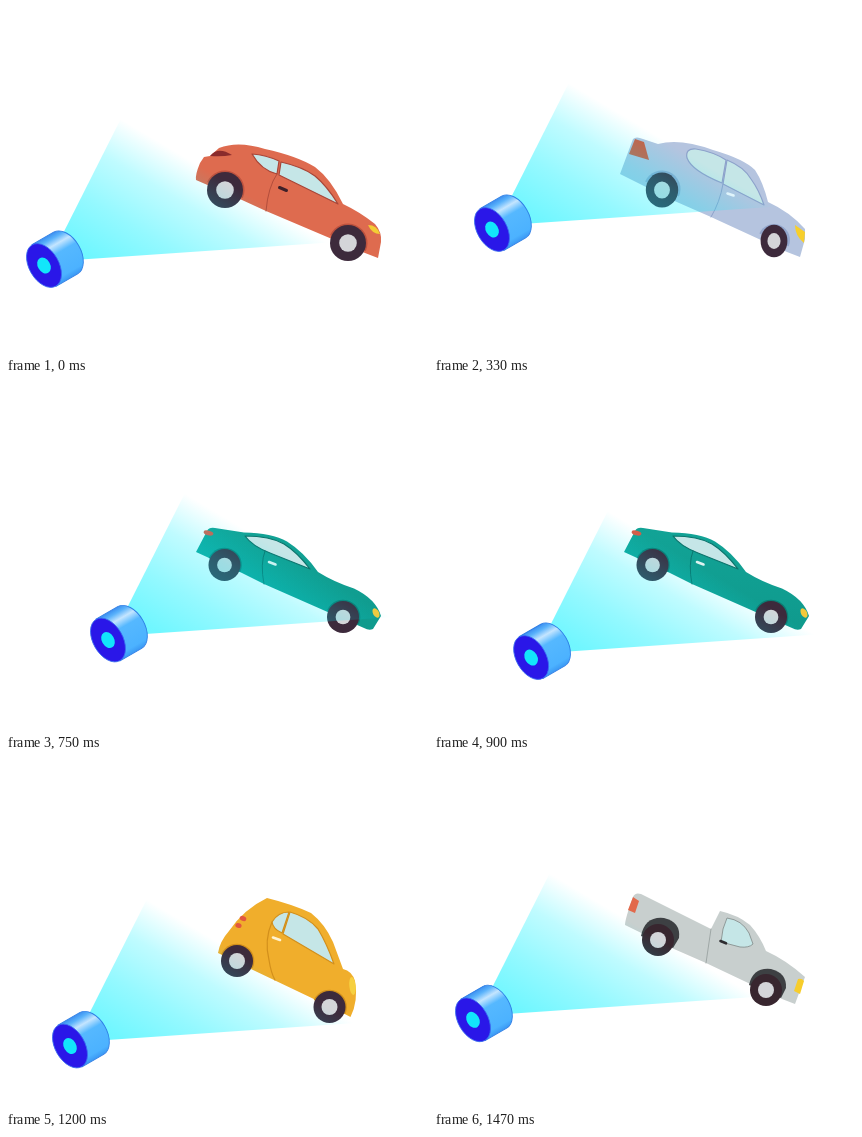
These frames come from a looping animation (422x349 px, 1500 ms). An HTML page:

```html
<!DOCTYPE html>
<html lang="en">
<head>
<meta charset="utf-8">
<title>Scanner</title>
<style>
  html, body { margin: 0; width: 100%; height: 100%; overflow: hidden; background: #fff; }
  svg { display: block; width: 100%; height: 100%; }
</style>
</head>
<body>
<svg viewBox="0 0 422 349" xmlns="http://www.w3.org/2000/svg">
  <defs>
    <linearGradient id="ray" gradientUnits="userSpaceOnUse" x1="30" y1="-20" x2="98" y2="-134">
      <stop offset="0" stop-color="#00f0ff" stop-opacity=".56"/>
      <stop offset=".35" stop-color="#00f0ff" stop-opacity=".42"/>
      <stop offset=".7" stop-color="#00f0ff" stop-opacity=".25"/>
      <stop offset="1" stop-color="#00f0ff" stop-opacity="0"/>
    </linearGradient>
    <linearGradient id="shell" x1="0" y1="0" x2="0" y2="1">
      <stop offset="0" stop-color="#3c8ff0"/>
      <stop offset=".1" stop-color="#59b2fb"/>
      <stop offset=".24" stop-color="#c4e5ff"/>
      <stop offset=".42" stop-color="#55b8ff"/>
      <stop offset=".88" stop-color="#4cb2ff"/>
      <stop offset="1" stop-color="#3a98f4"/>
    </linearGradient>
    <linearGradient id="teal" x1="0" y1="0" x2="0" y2="1">
      <stop offset="0" stop-color="#12a396"/>
      <stop offset="1" stop-color="#0f9a8d"/>
    </linearGradient>
  </defs>
  <g id="cars"></g>
  <g id="scanner">
    <path d="M19,-32 L77,-147 L285,-23 L30,-5.5Z" fill="url(#ray)"/>
    <g transform="rotate(-30)">
      <path d="M0,-24 H25 A15,24 0 0 1 25,24 H0Z" fill="url(#shell)" stroke="#2f7fe6" stroke-width=".9"/>
      <ellipse rx="14.8" ry="23.8" fill="#2a17e8" stroke="#3a6cf0" stroke-width=".8"/>
      <ellipse rx="6.2" ry="8.5" fill="#12e6fb"/>
    </g>
  </g>
</svg>
<script>
const LOOP = 1500;
const GLASS = '#c5e6e7';

const shape = (d, fill, line = 'none', w = 1) =>
  `<path d="${d}" fill="${fill}" stroke="${line}" stroke-width="${w}" stroke-linejoin="round"/>`;
const stroke = (d, color, w = 1) =>
  `<path d="${d}" fill="none" stroke="${color}" stroke-width="${w}" stroke-linecap="round"/>`;
const oval = (x, y, rx, ry, fill, turn = 0) =>
  `<ellipse cx="${x}" cy="${y}" rx="${rx}" ry="${ry}" fill="${fill}" transform="rotate(${turn} ${x} ${y})"/>`;
const wheel = (x, y, rx, ry, hub, tyre = '#3d2a3c') =>
  oval(x, y, rx, ry, tyre) + oval(x, y, hub * rx, hub * ry, '#d4d5d9');
// Upper half of the wheel housing, tilted with the car
const arch = (x, y, r, fill) =>
  `<path d="M${-r},0 A${r},${r} 0 0 1 ${r},0Z" fill="${fill}" transform="translate(${x} ${y}) rotate(24)"/>`;

const hatchback = [
  shape('M190,174 Q189,169 194,157 L198,151 L204,150 L213,142 Q232,134.5 259,143 Q291,150 309,161 Q325,173 337,198 Q354,206 369,218 Q376,226 375,236 L372,252 L359,247 L260,205 L236,194Z', '#de6b4f'),
  shape('M204,150 Q212,140 226,149 Q216,151 204,150Z', '#8a2b2c'),
  arch(219, 184, 19.5, '#bd523e'),
  arch(342, 237, 19.5, '#bd523e'),
  shape('M246,148 Q260,149 273,155 L271,168 Q255,164 246,148Z', GLASS, '#a84537', 1.2),
  shape('M275,156 Q297,161 309,170 Q321,180 332,198 L273,169Z', GLASS, '#a84537', 1.2),
  stroke('M271,168 Q262,181 260,205', '#b24d3b'),
  stroke('M273.5,181.5 L280.5,184.5', '#3d2029', 3),
  shape('M362,219 Q371,219 374,228 Q366,228 362,219Z', '#f3cd34'),
  wheel(219, 184, 18, 18, .49),
  wheel(342, 237, 18, 18, .49)
];

const sedan = [
  shape('M186,168 L199,133 Q202,130 209,133 L224,138 Q246,132 279,144 Q310,153 321,164 Q329,176 334,196 Q356,206 371,223 L371,233 L366,251 L353,246 L277,211 L236,193Z', '#b5c4df'),
  shape('M201,133 L210,136 L215,154 L195,148Z', '#cf5a3e'),
  arch(228, 183, 18.5, '#93a7cd'),
  arch(340, 234, 16, '#93a7cd'),
  shape('M253,152 Q251,142 262,143 Q280,146 292,154 L288,177 Q258,165 253,152Z', GLASS, '#8da2cb', 1.2),
  shape('M293,154 Q310,161 317,173 Q325,184 330,199 L289,178Z', GLASS, '#8da2cb', 1.2),
  stroke('M289,178 Q286,196 277,211', '#8da2cb'),
  stroke('M293.5,187.5 L299.5,189.5', '#f3f5fb', 2.6),
  shape('M361,219 L371,226 L370,237 Q361,230 361,219Z', '#f7cf2b'),
  wheel(228, 184, 16.2, 17.5, .49),
  wheel(340, 235, 13.4, 16.2, .49)
];

const coupe = [
  shape('M190,169 L201,148 Q203,144 209,145 L238,149.5 Q266,150 281,158.5 Q298,169 312,189 Q328,199 348,205.5 Q370,216 375,233 L367,246 Q363,248 358,245 L258,201 L236,190Z', 'url(#teal)'),
  oval(202.5, 150, 5, 2.4, '#d95a45', 15),
  arch(218.5, 182, 17.3, '#0b7d74'),
  arch(337, 234, 17.3, '#0b7d74'),
  shape('M239,153 Q264,153 278,161 Q291,169 304,186 L264,170 Q246,163 239,153Z', GLASS, '#0b746c', 1.2),
  stroke('M259,168 Q254,181 258,201', '#0a776f'),
  stroke('M263,179 L269.5,181.5', '#dff2f0', 2.6),
  oval(370, 230, 3, 5, '#f4c93a', -28),
  wheel(218.5, 182, 16, 16, .46),
  wheel(337, 234, 16, 16, .46)
];

const mini = [
  shape('M212,193 Q214,181 223,171 Q238,149 261,138 Q287,144.5 305,153 Q319,164 327,182 L337,209 Q346,211 349,221 Q352.5,241 344.5,257 L333,251 L247,210Z', '#f0ae2c'),
  oval(237, 158.5, 3.4, 2.5, '#e2573f', 20),
  oval(232.5, 165.5, 3.2, 2.4, '#e2573f', 20),
  arch(231, 201, 17.3, '#d28f1b'),
  arch(323.5, 247, 17.3, '#d28f1b'),
  shape('M266,162 Q272,152 283,152 L276,173 Q267,169 266,162Z', GLASS, '#d28f1b', 1.2),
  shape('M284,152 Q302,157 312,169 Q321,184 328,204 L277,174Z', GLASS, '#d28f1b', 1.2),
  stroke('M266,162 Q258,180 263,200 Q265,213 269,220', '#d28f1b', 1.2),
  stroke('M267,177.5 L274,180', '#fff3d2', 2.6),
  oval(346.5, 226, 3.2, 9, '#f6d040', -6),
  wheel(231, 201, 16, 16, .5),
  wheel(323.5, 247, 16, 16, .5)
];

const pickup = [
  shape('M191,165 Q191,159 199,137 Q201,132 207,134 L277,169 L286,151 Q304,155 316,165 Q326,176 332,191 Q352,200 371,217 L361,244 L348,239 L272,203 L240,189Z', '#c8cfce'),
  shape('M199,137 L205,141 L201,153 L194,150Z', '#e2694b'),
  shape('M207,176 Q211,156 230,158 Q247,162 245,178 L239,188Z', '#3d4043'),
  shape('M315,225 Q319,207 337,209 Q353,213 352,228 L347,238Z', '#3d4043'),
  shape('M287,182 Q288,168 293,158 Q308,160 315,173 L319,184 Q315,188 306,187Z', GLASS, '#8f9998', 1),
  stroke('M277,169 L272,203', '#9aa3a2', .9),
  stroke('M286.5,181 L292,183.3', '#2e2c30', 2.6),
  shape('M364,219 Q368,218 370,221 L366,234 L360,231Z', '#f7cd2b'),
  wheel(224, 180, 16, 16, .5, '#38262f'),
  wheel(332, 230, 16, 16, .5, '#38262f')
];

const fleet = document.getElementById('cars');
fleet.innerHTML = [hatchback, sedan, coupe, mini, pickup]
  .map(parts => `<g>${parts.join('')}</g>`).join('');
const cars = [...fleet.children];
const scanner = document.getElementById('scanner');

// Waypoints of the lens centre: time, x, y
const path = [
  [0, 38, 259.5], [75, 36.5, 250], [180, 41, 234], [330, 58, 223.5], [480, 78, 229],
  [750, 102, 257], [1050, 85, 289], [1200, 64, 286], [1470, 39, 259.8]
];
const n = path.length;

function point(i) {
  const turn = Math.floor(i / n), [t, x, y] = path[i - turn * n];
  return [t + turn * LOOP, x, y];
}

// Cubic Hermite through the waypoints, closed over the loop
function along(t, axis) {
  let i = n - 1;
  while (path[i][0] > t) i--;
  const [a, b, c, d] = [-1, 0, 1, 2].map(k => point(i + k));
  const span = c[0] - b[0], u = (t - b[0]) / span;
  const m0 = (c[axis] - a[axis]) / (c[0] - a[0]) * span;
  const m1 = (d[axis] - b[axis]) / (d[0] - b[0]) * span;
  const u2 = u * u, u3 = u2 * u;
  return (2 * u3 - 3 * u2 + 1) * b[axis] + (u3 - 2 * u2 + u) * m0
       + (3 * u2 - 2 * u3) * c[axis] + (u3 - u2) * m1;
}

function draw(t) {
  const shown = Math.max(0, Math.floor((t - 30) / 300));
  cars.forEach((car, i) => { car.style.display = i === shown ? '' : 'none'; });
  scanner.setAttribute('transform', `translate(${along(t, 1).toFixed(2)} ${along(t, 2).toFixed(2)})`);
}

function tick() {
  const t = performance.now() % LOOP;
  draw(Math.floor(t / 30) * 30);
  requestAnimationFrame(tick);
}
tick();
</script>
</body>
</html>
```
